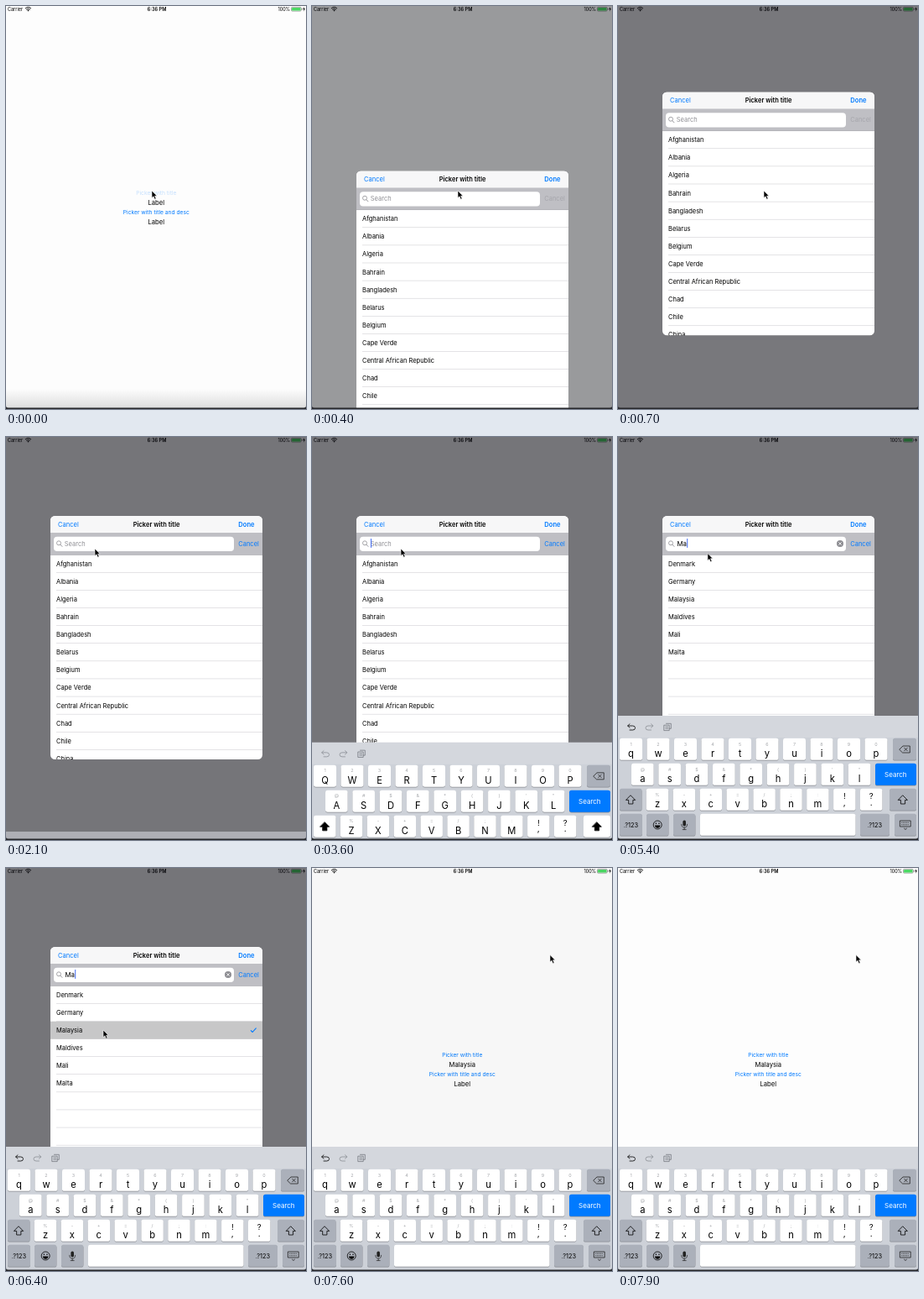
Recreate the animation shown at these times as an HTML page. Size 358x480 px, loop 8 s.

```html
<!DOCTYPE html>
<html lang="en">
<head>
<meta charset="utf-8">
<title>Country picker</title>
<style>
html, body { margin: 0; width: 100%; height: 100%; overflow: hidden; background: #fdfdfd; }
svg { display: block; width: 358px; height: 480px; }
text { font-family: Inter, Roboto, sans-serif; white-space: pre; }
</style>
</head>
<body>
<svg id="stage" viewBox="0 0 358 480">
  <defs>
    <linearGradient id="fade" x1="0" y1="0" x2="0" y2="1">
      <stop offset="0" stop-color="#ddd" stop-opacity="0"/><stop offset="1" stop-color="#ddd"/>
    </linearGradient>
    <clipPath id="sheetClip"><rect x="53" width="253" height="290" rx="5.5"/></clipPath>
  </defs>
  <rect width="358" height="480" fill="#fdfdfd"/>
  <rect id="footer" y="456" width="358" height="23" fill="url(#fade)"/>
  <g id="screen"></g>
  <rect id="dim" width="358" height="480" fill="rgb(2,3,10)"/>
  <g id="sheet" clip-path="url(#sheetClip)"></g>
  <g id="keyboard"></g>
  <path d="M0 476Q0 478.5 2.5 478.5H355.5Q358 478.5 358 476V480H0Z" fill="#25262a"/>
  <path id="cursor" d="M0 0V8.6L2 6.8 3.5 10.2 5.1 9.5 3.6 6.2H6.2Z" fill="#000" stroke="#fff" stroke-width=".6"/>
</svg>
<script>
const LOOP = 8000, BLUE = '#007aff', INK = '#000', GREY = '#8e8e93';
const SHEET_TOP = 94, SHEET_TRAVEL = 386, ROW = 21.1, LIST_TOP = 46.5;
const KEYS_TOP = 332, BAR_TOP = 452, OFFSCREEN = 478;
const COUNTRIES = ['Afghanistan', 'Albania', 'Algeria', 'Bahrain', 'Bangladesh', 'Belarus', 'Belgium',
  'Cape Verde', 'Central African Republic', 'Chad', 'Chile', 'China',
  'Denmark', 'Germany', 'Malaysia', 'Maldives', 'Mali', 'Malta'];
const $ = id => document.getElementById(id);
const screen = $('screen'), sheet = $('sheet'), keyboard = $('keyboard');

function add(parent, tag, attrs = {}, content) {
  const el = document.createElementNS('http://www.w3.org/2000/svg', tag);
  set(el, attrs);
  if (content !== undefined) el.textContent = content;
  return parent.appendChild(el);
}
function set(el, attrs) {
  for (const name in attrs) el.setAttribute(name, attrs[name]);
}
// Text whose capitals are centred vertically on y.
function label(parent, content, x, y, size, fill = INK, anchor = 'middle', weight = 400) {
  return add(parent, 'text', { x, y: y + size * .364, 'font-size': size, fill,
    'text-anchor': anchor, 'font-weight': weight }, content);
}
function box(parent, x, y, width, height, fill, rx = 0) {
  return add(parent, 'rect', { x, y, width, height, fill, rx });
}
function line(parent, d, stroke = INK, width = .8) {
  return add(parent, 'path', { d, fill: 'none', stroke, 'stroke-width': width,
    'stroke-linecap': 'round', 'stroke-linejoin': 'round' });
}
const show = (el, on) => el.setAttribute('visibility', on ? 'inherit' : 'hidden');

// Status bar and the page behind the sheet
label(screen, 'Carrier', 2, 3.6, 5.5, INK, 'start');
line(screen, 'M23.3 2.7Q26.5 -.3 29.7 2.7M24.5 4Q26.5 2.2 28.5 4', INK, .9);
add(screen, 'circle', { cx: 26.5, cy: 5.3, r: .9 });
label(screen, '6:36 PM', 180, 3.6, 5.6, INK, 'middle', 600);
label(screen, '100%', 339, 3.6, 5.5, INK, 'end');
add(screen, 'rect', { x: 340.5, y: 1.3, width: 11.6, height: 4.8, rx: 1.1, fill: 'none', stroke: '#555', 'stroke-width': .5 });
box(screen, 341.1, 1.9, 10.4, 3.6, '#4cd964', .6);
box(screen, 352.7, 2.9, .8, 1.6, '#555');
add(screen, 'path', { d: 'M356 1L354.4 4H355.5L355 6.5 357 3.2H355.8Z' });
const titleButton = label(screen, 'Picker with title', 179.3, 222.5, 6.7, BLUE);
const result = label(screen, 'Label', 179.3, 234, 7.6);
label(screen, 'Picker with title and desc', 179.3, 246, 6.7, BLUE);
label(screen, 'Label', 179.3, 257.5, 7.6);

// Sheet, drawn from its own top edge
box(sheet, 53, 0, 253, 290, '#fff');
box(sheet, 53, 0, 253, 20, '#f7f7f8');
label(sheet, 'Cancel', 62, 10, 7.55, BLUE, 'start');
label(sheet, 'Picker with title', 179.5, 10, 7.5, INK, 'middle', 600);
label(sheet, 'Done', 296.5, 10, 7.55, BLUE, 'end', 600);
box(sheet, 53, 20, 253, 26.5, '#bfbfc4');
box(sheet, 53, 46, 253, .6, '#a9a9ae');
box(sheet, 57, 24.8, 215, 17.2, '#fff', 4);
add(sheet, 'circle', { cx: 63, cy: 32.3, r: 2.5, fill: 'none', stroke: GREY, 'stroke-width': .8 });
line(sheet, 'M64.9 34.2L67 36.4', GREY, .9);
const placeholder = label(sheet, 'Search', 69.8, 33, 7.5, GREY, 'start');
const typed = label(sheet, '', 70.5, 33, 7.8, INK, 'start');
const caret = box(sheet, 70, 27, 1, 11, '#426bf2', .4);
const clear = add(sheet, 'g');
add(clear, 'circle', { cx: 265, cy: 33, r: 4, fill: GREY });
line(clear, 'M263.6 31.6L266.4 34.4M266.4 31.6L263.6 34.4', '#fff', .8);
const searchCancel = label(sheet, 'Cancel', 289.5, 33, 7.55, BLUE);
const selection = add(sheet, 'g');
box(selection, 53, LIST_TOP + 2 * ROW, 253, ROW, '#c7c7c8');
line(selection, 'M292.3 99.6L294.2 101.5 298.3 96.8', BLUE, 1.1);
const rows = Array.from({ length: 12 }, (_, i) => {
  const top = LIST_TOP + i * ROW;
  box(sheet, 60, top + ROW - .5, 246, .5, '#c8c7cc');
  return label(sheet, '', 60, top + ROW / 2, 7.5, INK, 'start');
});

// Keyboard, drawn from its own top edge
const KEY_GREY = '#abb0ba';
const letters = [];
box(keyboard, 0, 0, 358, 148, '#cdd1d8');
box(keyboard, 0, 0, 358, 26, '#d4d7dd');
function key(x, y, width, fill = '#fff', parent = keyboard) {
  box(parent, x, y + .8, width, 26, '#898c92', 2.6);
  return box(parent, x, y, width, 26, fill, 2.6);
}
function keyRow(chars, hints, x, y, step, width) {
  [...chars].forEach((char, i) => {
    const cx = x + i * step;
    key(cx - width / 2, y, width);
    label(keyboard, hints[i], cx, y + 6.8, 5.4, '#a5a7ab');
    letters.push({ char, el: label(keyboard, char, cx, y + 18, 11.2) });
  });
}
const undo = line(keyboard, 'M14 9.8L11.6 12 14 14.2M11.8 12H17.5Q20.5 12 20.5 14.5T17.5 17H14');
line(keyboard, 'M39.5 9.8L41.9 12 39.5 14.2M41.7 12H36Q33 12 33 14.5T36 17H39.5', '#8c9096');
line(keyboard, 'M57.5 9.3H63.3V15.3H61.2M55.2 11.2H61.2V17.6H55.2ZM56.8 13.3H59.6M56.8 15.3H59.6', '#757980', .8);
keyRow('QWERTYUIOP', '1234567890', 15.5, 26.8, 32.5, 27);
keyRow('ASDFGHJKL', '@#$&*()\'"', 29.3, 56.8, 32.35, 26.6);
keyRow('ZXCVBNM', '%-+=/;:', 47, 86.8, 31.9, 26.4);
[['!', ',', 270.3], ['?', '.', 302.2]].forEach(([upper, lower, x]) => {
  key(x - 13.2, 86.8, 26.4);
  label(keyboard, upper, x, 96, 9.5);
  label(keyboard, lower, x, 103, 10);
});
key(328, 26.8, 28, KEY_GREY);
line(keyboard, 'M336 40L340 36H348.3V44H340ZM341.7 38.2L345.3 41.8M345.3 38.2L341.7 41.8', '#222', .8);
key(307, 56.8, 49, BLUE);
label(keyboard, 'Search', 331.3, 70, 8, '#fff');
const shifts = [[2, 26.5], [324, 32]].map(([x, width]) => {
  const back = key(x, 86.8, width), c = x + width / 2;
  const arrow = line(keyboard, `M${c} 95L${c + 5.4} 100.4H${c + 2.6}V105H${c - 2.6}V100.4H${c - 5.4}Z`, INK, .8);
  return { back, arrow };
});
key(2, 116.8, 27, KEY_GREY);
label(keyboard, '.?123', 15.5, 130, 7.4);
key(34, 116.8, 26.4, KEY_GREY);
add(keyboard, 'circle', { cx: 47.2, cy: 130, r: 5, fill: 'none', stroke: INK, 'stroke-width': .8 });
add(keyboard, 'path', { d: 'M44 130.6H50.4Q50 133.8 47.2 133.8T44 130.6Z' });
[45.4, 49].forEach(cx => add(keyboard, 'circle', { cx, cy: 128.3, r: .75 }));
const wideSpace = add(keyboard, 'g'), micSpace = add(keyboard, 'g');
key(66, 116.8, 217.5, '#fff', wideSpace);
key(66, 116.8, 26.4, KEY_GREY, micSpace);
key(98, 116.8, 185.5, '#fff', micSpace);
box(micSpace, 77.4, 124.4, 3.6, 7.2, '#222', 1.8);
line(micSpace, 'M75.8 129.3Q75.8 133.2 79.2 133.2T82.6 129.3M79.2 133.2V135.6M77.2 135.6H81.2', '#222', .7);
key(289, 116.8, 35, KEY_GREY);
label(keyboard, '.?123', 306.5, 130, 7.4);
key(330, 116.8, 26, KEY_GREY);
line(keyboard, 'M336.8 125H349.2V132H336.8ZM341.5 134.2L343 135.5 344.5 134.2', '#222', .8);
line(keyboard, 'M338.5 127.2H347.5M338.5 129.8H347.5', '#222', .8).setAttribute('stroke-dasharray', '.4 1.5');

// Pointer stops: time, x, y
const POINTER = [[0, 174, 220], [1150, 174, 220], [1600, 106, 133], [5250, 106, 133],
  [6050, 116, 193], [6600, 116, 193], [7120, 284, 103.5], [LOOP, 284, 103.5]];
const CARET_ON = [[2150, 2950], [3380, 3950], [4450, 5500], [5950, 6550], [7000, 7500]];

// Critically damped spring from 0 to 1.
function spring(t, start) {
  const u = Math.max(0, t - start) * .0104;
  return 1 - (1 + u) * Math.exp(-u);
}
function pointerAt(t) {
  const i = Math.max(1, POINTER.findIndex(stop => t < stop[0]));
  const [t0, x0, y0] = POINTER[i - 1], [t1, x1, y1] = POINTER[i];
  const u = (t - t0) / (t1 - t0), e = u * u * (3 - 2 * u);
  return `translate(${x0 + (x1 - x0) * e} ${y0 + (y1 - y0) * e})`;
}

let lastQuery;
function showQuery(query) {
  if (query === lastQuery) return;
  lastQuery = query;
  const found = COUNTRIES.filter(name => name.toLowerCase().includes(query.toLowerCase()));
  rows.forEach((row, i) => { row.textContent = found[i] || ''; });
  typed.textContent = query;
  const upper = query === '';
  show(placeholder, upper);
  show(clear, !upper);
  show(wideSpace, upper);
  show(micSpace, !upper);
  undo.setAttribute('stroke', upper ? '#8c9096' : INK);
  letters.forEach(({ char, el }) => { el.textContent = upper ? char : char.toLowerCase(); });
  shifts.forEach(({ back, arrow }) => {
    back.setAttribute('fill', upper ? '#fff' : KEY_GREY);
    arrow.setAttribute('fill', upper ? INK : 'none');
  });
  caret.setAttribute('x', upper ? 70 : 70.8 + typed.getComputedTextLength());
}

function render(t) {
  const open = spring(t, 150) - spring(t, 7120);
  $('dim').setAttribute('opacity', .54 * open);
  sheet.setAttribute('transform', `translate(0 ${SHEET_TOP + SHEET_TRAVEL * (1 - open)})`);
  titleButton.setAttribute('opacity', .22 + .78 * Math.min(1, t / 200));
  $('footer').setAttribute('opacity', Math.max(0, 1 - t / 250));
  result.textContent = t < 7120 ? 'Label' : 'Malaysia';

  const bar = spring(t, 1995), full = spring(t, 3350);
  const top = OFFSCREEN - (OFFSCREEN - BAR_TOP) * bar - (BAR_TOP - KEYS_TOP) * full;
  set(keyboard, { transform: `translate(0 ${top})`, opacity: Math.min(1, .3 + bar) });
  show(keyboard, t >= 1995);

  showQuery(t < 4450 ? '' : t < 4800 ? 'M' : 'Ma');
  show(caret, CARET_ON.some(([from, to]) => t >= from && t < to));
  show(selection, t >= 6200);
  searchCancel.setAttribute('fill', t < 2050 ? '#a6a6ac' : BLUE);
  $('cursor').setAttribute('transform', pointerAt(t));
}

const start = performance.now();
function tick() {
  render((performance.now() - start) % LOOP);
  requestAnimationFrame(tick);
}
tick();
</script>
</body>
</html>
```
